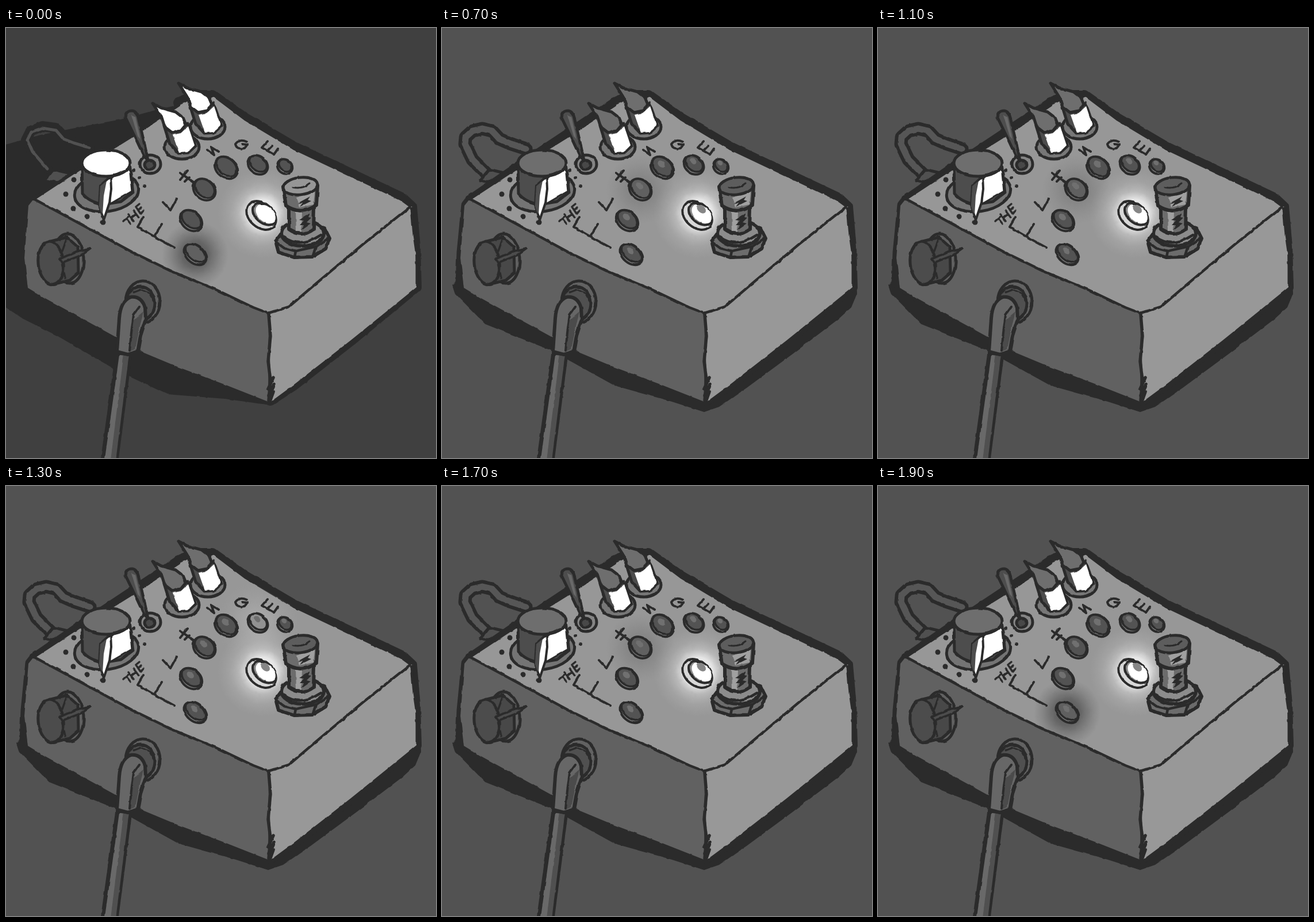
Animation, 748 px wide and 748 px high, one loop 2 s. Source, as an HTML page:

```html
<!DOCTYPE html>
<html lang="en">
<head>
<meta charset="utf-8">
<title>Flange pedal</title>
<style>
html, body { margin: 0; width: 100%; height: 100%; overflow: hidden; background: #404040; }
svg { display: block; width: 100vw; height: 100vh; }
.ln { fill: none; stroke: #2b2b2b; stroke-width: 4.5; stroke-linecap: round; stroke-linejoin: round; }
.o { stroke: #2b2b2b; stroke-width: 5; stroke-linejoin: round; stroke-linecap: round; }
.bg { fill: #525252; }
.hot { fill: #6e6e6e; }
.cap { fill: #5d5d5d; }
.night .bg { fill: #404040; }
.night .hot { fill: #fff; }
.night .cap { fill: #969696; }
.day .n, .night .d { display: none; }
</style>
</head>
<body>
<svg id="stage" class="night" viewBox="0 0 748 748" preserveAspectRatio="none">
  <defs>
    <radialGradient id="lamp">
      <stop offset="0" stop-color="#fff"/>
      <stop offset=".32" stop-color="#fff" stop-opacity=".75"/>
      <stop offset=".5" stop-color="#f4f4f4" stop-opacity=".36"/>
      <stop offset=".72" stop-color="#ddd" stop-opacity=".16"/>
      <stop offset="1" stop-color="#ccc" stop-opacity="0"/>
    </radialGradient>
    <radialGradient id="dark">
      <stop offset="0" stop-color="#444" stop-opacity=".85"/>
      <stop offset=".4" stop-color="#484848" stop-opacity=".62"/>
      <stop offset=".75" stop-color="#505050" stop-opacity=".23"/>
      <stop offset="1" stop-color="#555" stop-opacity="0"/>
    </radialGradient>
    <radialGradient id="pale">
      <stop offset="0" stop-color="#ccc" stop-opacity=".75"/>
      <stop offset=".5" stop-color="#bbb" stop-opacity=".4"/>
      <stop offset="1" stop-color="#aaa" stop-opacity="0"/>
    </radialGradient>
    <clipPath id="topClip"><path d="M48 297L130 243 300 128 362 118 415 160 500 210 690 300 703 311 600 393 492 484 455 495 365 455 220 390Z"/></clipPath>
    <filter id="rough" x="0" y="0" width="748" height="748" filterUnits="userSpaceOnUse" color-interpolation-filters="sRGB">
      <feTurbulence type="fractalNoise" baseFrequency=".07" numOctaves="2" seed="4"/>
      <feDisplacementMap in="SourceGraphic" scale="3" xChannelSelector="R" yChannelSelector="G"/>
    </filter>
  </defs>

  <rect class="bg" width="748" height="748"/>
  <g filter="url(#rough)">
    <!-- shadows -->
    <path class="n" fill="#2b2b2b" d="M-5 204L60 186 140 170 205 158 270 140 320 130 458 500 460 656 380 645 280 637 195 597 90 536 30 506 -5 483Z"/>
    <path class="d" fill="#2b2b2b" d="M28 435L18 448 22 461 75 515 190 561 300 622 400 650 456 668 482 659 530 626 610 567 690 506 712 486 722 462 720 420 460 640Z"/>

    <!-- rear lead -->
    <g fill="none" stroke-linecap="round" stroke-linejoin="round">
      <g class="d">
        <path id="lead" stroke="#2b2b2b" stroke-width="23" d="M76 252L53 229 40 202 41 190 53 179 70 175 87 179 100 193 118 201 146 210"/>
        <path stroke="#565656" stroke-width="11" d="M76 252L53 229 40 202 41 190 53 179 70 175 87 179 100 193 118 201 146 210"/>
      </g>
      <g class="n">
        <path stroke="#2b2b2b" stroke-width="18" d="M72 245L45 215 35 195 43 179 63 171 87 174 100 188 118 200 145 208"/>
        <path stroke="#515151" stroke-width="5" d="M72 245L46 215 37 195 44 181 63 174 87 178 100 193 118 200 145 208"/>
      </g>
    </g>
    <path class="o" fill="#505050" d="M66 265L82 246 112 253 96 270Z"/>

    <!-- case -->
    <path class="o" style="stroke-width:18" fill="#2b2b2b" d="M300 130L328 117 360 117 415 156 500 206 690 296 706 311 712 380 714 450 600 544 500 622 460 648 456 500Z"/>
    <path class="d o" style="stroke-width:17" fill="#2b2b2b" d="M300 130L130 243 49 299 42 308 34 390 32 443 70 470 455 645 456 500Z"/>
    <path fill="#616161" d="M47 299L39 309 32 400 38 452 68 470 190 537 240 565 300 590 380 620 456 650 457 495 220 388Z"/>
    <path fill="#989898" d="M456 496L492 484 600 395 707 310 712 380 714 451 600 543 500 621 462 649Z"/>
    <path fill="#979797" d="M48 297L130 243 220 188 300 135 328 122 362 121 415 161 500 212 686 300 701 311 600 393 492 484 455 495 365 455 220 390Z"/>

    <g clip-path="url(#topClip)">
      <circle id="glow" r="58"/>
      <circle cx="446" cy="323" r="78" fill="url(#lamp)"/>
    </g>

    <path class="ln" d="M48 297L100 325 220 390 290 424 365 455 430 486 456 496 492 485 540 444 620 377 703 311"/>
    <path class="ln" d="M48 297L130 243 215 190 300 134" style="stroke-width:6"/>
    <path class="ln" d="M457 498L460 535 456 580 460 612 457 648M465 608L456 628M466 620L457 640M465 633L460 647" style="stroke-width:5.5"/>
    <path class="ln" d="M706 314L710 360 715 395 715 446" style="stroke-width:5"/>

    <!-- lettering -->
    <path class="ln" style="stroke-width:3.5" d="M204 336L214 327M209 331L217 341M213 324L222 336M222 318L231 330M218 330L226 324M226 311L234 323 239 317M226 311L232 306M230 317L235 312"/>
    <path class="ln" style="stroke-width:4" d="M239 329L229 346 260 364 293 382M258 362L271 341M273 303L286 317 297 297M326 268L303 252M303 264L316 248M311 267L319 259M350 212L362 221 357 207 370 215M419 198Q406 192 399 202Q401 212 415 209L420 203 411 202M455 197L445 208 466 220 473 210M455 213L463 205"/>

    <!-- main knob -->
    <ellipse class="o" cx="175" cy="286" rx="56" ry="33" fill="#747474" transform="rotate(-8 175 286)"/>
    <path class="o" fill="#4d4d4d" d="M132 235L133 288Q145 303 170 307L200 302 221 286 215 236Z"/>
    <path class="o" fill="#fff" style="stroke-width:3" d="M180 262L215 243 219 284 181 306Z"/>
    <ellipse class="o hot" cx="174" cy="235" rx="42" ry="23"/>
    <path class="o" fill="#fff" style="stroke-width:4" d="M182 258L164 274 162 308 170 334 180 304 183 280Z"/>
    <path fill="#4d4d4d" d="M164 275L175 266 170 292 168 325 162 308Z"/>
    <g id="dots" fill="#2b2b2b"></g>

    <!-- toggle -->
    <ellipse class="o" cx="251" cy="237" rx="18" ry="16" fill="#858585"/>
    <ellipse class="o" cx="250" cy="238" rx="9" ry="8" fill="#484848"/>
    <path class="o" fill="#4d4d4d" d="M208 156Q209 144 219 144Q228 144 231 160L240 198 247 230 240 223 226 193Z"/>
    <path fill="#696969" d="M218 151L225 154 234 194 229 188Z"/>

    <!-- candle knobs -->
    <g id="candle">
      <ellipse class="o" cx="306" cy="207" rx="30" ry="21" fill="#777"/>
      <path class="o" fill="#4d4d4d" d="M275 170L292 178 316 166 330 205 317 217 300 218 285 202Z"/>
      <path fill="#fff" d="M290 186L304 183 317 171 328 204 316 216 301 217Z"/>
      <path class="o hot" d="M255 131L270 139 295 146 308 156 313 168 304 179 289 182 276 172 271 156Z"/>
    </g>
    <use href="#candle" transform="translate(45 -35)"/>

    <g id="leds"></g>

    <!-- lamp -->
    <g transform="rotate(42 444 326)">
      <ellipse class="o" style="stroke-width:4" cx="444" cy="326" rx="29" ry="21" fill="#d8d8d8"/>
      <ellipse class="o" style="stroke-width:4" cx="446" cy="321" rx="23" ry="15" fill="#8a8a8a"/>
      <ellipse cx="448" cy="319" rx="20" ry="13" fill="#fff"/>
      <ellipse class="d" cx="442" cy="313" rx="9" ry="6" fill="#868686"/>
    </g>

    <!-- footswitch -->
    <path class="o" style="stroke-width:6" fill="#6c6c6c" d="M469 371L483 352 520 337 554 348 563 366 556 384 533 398 501 399 474 390Z"/>
    <path class="ln" d="M469 372L484 383 504 388 540 380 562 365M504 388L502 398M540 380L535 396"/>
    <ellipse class="o" style="stroke-width:6" cx="516" cy="357" rx="37" ry="22" fill="#8c8c8c"/>
    <path class="ln" d="M484 364Q511 384 548 360"/>
    <path class="o" style="stroke-width:6" fill="#6c6c6c" d="M492 312L492 350Q514 366 535 350L536 310Z"/>
    <path fill="#a0a0a0" d="M504 319L515 319 514 354 505 354Z"/>
    <path fill="#2b2b2b" d="M510 334L529 322 526 329 531 330 523 338 530 340 514 351 518 343 511 343 518 335Z"/>
    <path class="o" style="stroke-width:6" fill="#6c6c6c" d="M482 276L487 309Q514 327 540 308L542 274Z"/>
    <path fill="#a0a0a0" d="M505 295L537 285 535 307 510 312Z"/>
    <path fill="#2b2b2b" d="M507 305L529 293 525 299 531 301 511 311 516 304Z"/>
    <ellipse class="o cap" cx="512" cy="275" rx="30" ry="15" transform="rotate(-7 512 275)"/>
    <path class="ln" d="M499 277Q514 281 528 270" style="stroke-width:3"/>

    <!-- side knob -->
    <ellipse class="o" cx="109" cy="401" rx="26" ry="43" fill="#616161" transform="rotate(-4 109 401)"/>
    <path class="o" fill="#484848" d="M74 372L106 364 125 381 126 426 111 439 85 445Z"/>
    <ellipse class="o" cx="78" cy="409" rx="22" ry="37" fill="#4c4c4c" transform="rotate(-6 78 409)"/>
    <path class="o" fill="#4c4c4c" style="stroke-width:4" d="M93 402L122 389 147 383 129 396 98 408Z"/>
    <path class="ln" d="M98 388L106 365M97 409L103 435" style="stroke-width:3.5"/>

    <!-- jack and lead -->
    <ellipse class="o" cx="238" cy="476" rx="30" ry="36" fill="#626262"/>
    <ellipse class="o" cx="234" cy="479" rx="25" ry="29" fill="#505050"/>
    <path class="o" style="stroke-width:7" fill="#696969" d="M194 565L168 752 192 752 216 567Z"/>
    <path fill="#505050" d="M205 566L214 568 191 752 182 752Z"/>
    <path class="o" style="stroke-width:6" fill="#676767" d="M197 505Q199 475 217 468Q236 466 242 487L243 507 234 535 229 563 212 568 193 563Z"/>
    <path fill="#4b4b4b" d="M222 508L239 493 231 528 225 559 214 563Z"/>
    <path class="ln" d="M232 485L222 499 218 530 215 561" style="stroke-width:4"/>
    <path class="ln" d="M222 460L235 455 250 462 259 480" style="stroke-width:3"/>
  </g>
</svg>
<script>
const NS = 'http://www.w3.org/2000/svg';
const $ = id => document.getElementById(id);
const STEP = 100;
const PATTERN = '12345643212345654321';

// x, y, rx, ry, glow radius, glow strength
const leds = [
  [329, 394, 23, 17, 58, -1], [322, 335, 22, 18, 58, -.6],
  [345, 281, 22, 19, 60, -.32], [383, 243, 23, 19, 58, .3],
  [438, 238, 20, 17, 72, .6], [485, 241, 15, 14, 45, .35]
];

function add(parent, tag, attrs) {
  const el = parent.appendChild(document.createElementNS(NS, tag));
  for (const k in attrs) el.setAttribute(k, attrs[k]);
  return el;
}

const dots = [[119, 264], [104, 289], [117, 314], [141, 328], [169, 338], [222, 247], [232, 261], [241, 275]];
dots.forEach(([cx, cy], i) => add($('dots'), 'circle', { cx, cy, r: i < 5 ? 4.5 : 3 }));

const faces = leds.map(([x, y, rx, ry]) => {
  const g = add($('leds'), 'g', { transform: `translate(${x} ${y}) rotate(40)` });
  add(g, 'ellipse', { class: 'o', rx: rx - 1, ry: ry - 2, fill: '#7c7c7c', style: 'stroke-width:4' });
  const face = add(g, 'ellipse', { class: 'o', cx: -1, cy: -2, rx: rx - 3, ry: ry - 5, style: 'stroke-width:3.5' });
  add(g, 'ellipse', { class: 'd', cx: -5, cy: -4, rx: rx * .32, ry: ry * .27, fill: '#707070' });
  return face;
});

function draw(time) {
  const step = Math.floor(time / STEP) % PATTERN.length;
  const lit = PATTERN[step] - 1;
  const day = step > 6 && step % 2 === 1;
  $('stage').setAttribute('class', day ? 'day' : 'night');

  const [x, y, , , r, power] = leds[lit];
  const attrs = { cx: x, cy: y, r, fill: power < 0 ? 'url(#dark)' : 'url(#pale)', opacity: Math.abs(power) };
  for (const k in attrs) $('glow').setAttribute(k, attrs[k]);

  faces.forEach((f, i) => {
    const glow = i === lit ? power : 0;
    f.setAttribute('fill', glow > 0 ? '#929292' : glow < 0 ? '#606060' : '#535353');
  });
}

let start, last = -1;
function tick(now) {
  start ??= now;
  const step = Math.floor((now - start) / STEP);
  if (step !== last) draw(now - start);
  last = step;
  requestAnimationFrame(tick);
}
draw(0);
requestAnimationFrame(tick);
</script>
</body>
</html>
```
